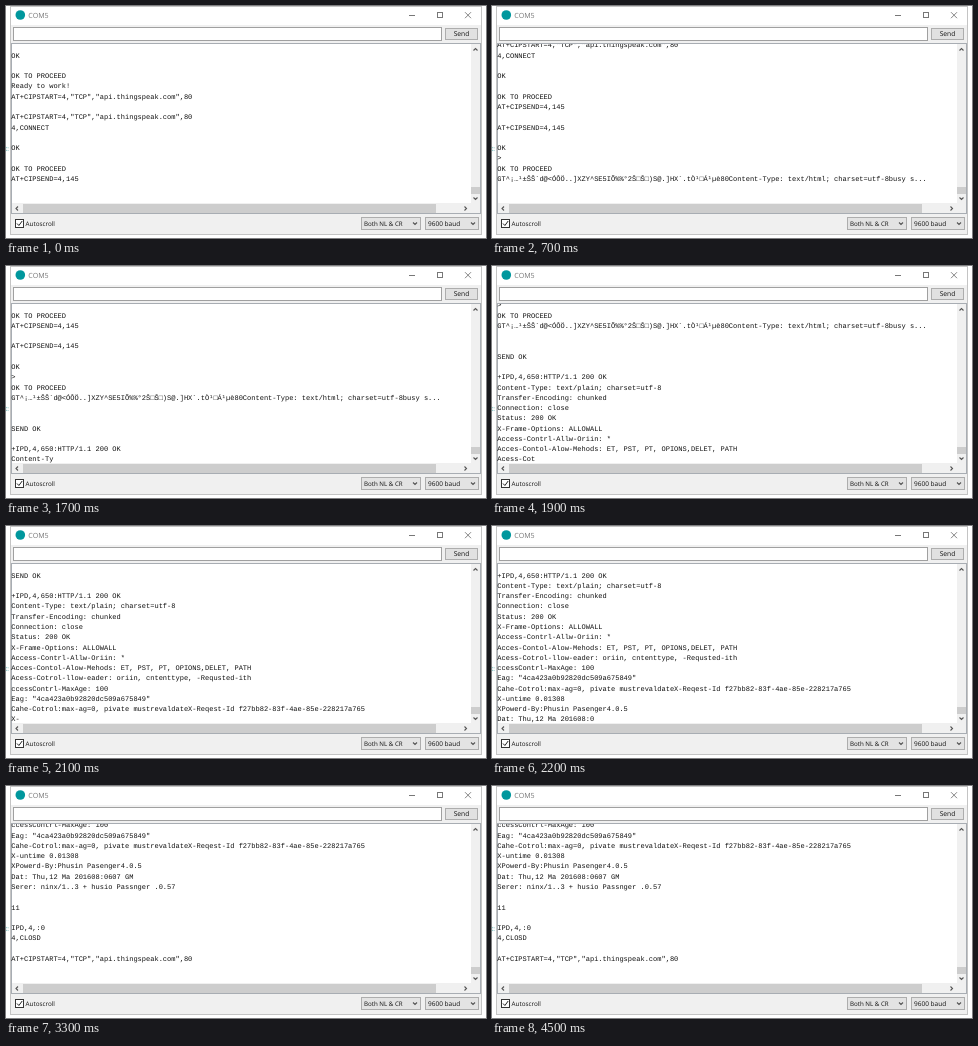
An HTML page with a canvas for the animation above (5100 ms loop, 480x232 px).

```html
<!DOCTYPE html>
<html lang="en">
<head>
<meta charset="utf-8">
<title>Serial monitor</title>
<style>
  html, body { margin: 0; width: 100%; height: 100%; overflow: hidden; background: #fff; }
  canvas { display: block; width: 480px; height: 232px; }
</style>
</head>
<body>
<canvas></canvas>
<script>
const LOOP = 5100, STEP = 100, ROW = 10.27, LAST_BASELINE = 195.4;
const MONO = '7.02px "Liberation Mono", monospace';
const UI = '"Open Sans", sans-serif';

const start = 'AT+CIPSTART=4,"TCP","api.thingspeak.com",80';
const send = 'AT+CIPSEND=4,145';
const lines = [
  'OK', '', 'OK TO PROCEED', 'Ready to work!', start, '',
  start, '4,CONNECT', '', 'OK', '', 'OK TO PROCEED', send, '',
  send, '', 'OK', '>', 'OK TO PROCEED',
  'GT^¡…¹±ŠŠ´d@<ÓÔÖ..]XZY^SE5IÕ%%°2Š□Š□)S@.]HX´.tÒ¹□Á¹µè80Content-Type: text/html; charset=utf-8busy s...',
  '', '', 'SEND OK', '',
  '+IPD,4,650:HTTP/1.1 200 OK',
  'Content-Type: text/plain; charset=utf-8',
  'Transfer-Encoding: chunked',
  'Connection: close',
  'Status: 200 OK',
  'X-Frame-Options: ALLOWALL',
  'Access-Contrl-Allw-Oriin: *',
  'Acces-Contol-Alow-Mehods: ET, PST, PT, OPIONS,DELET, PATH',
  'Acess-Cotrol-llow-eader: oriin, cntenttype, -Requsted-ith',
  'ccessContrl-MaxAge: 100',
  'Eag: "4ca423a0b92820dc509a675849"',
  'Cahe-Cotrol:max-ag=0, pivate mustrevaldateX-Reqest-Id f27bb82-83f-4ae-85e-228217a765',
  'X-untime 0.01308',
  'XPowerd-By:Phusin Pasenger4.0.5',
  'Dat: Thu,12 Ma 201608:0607 GM',
  'Serer: ninx/1..3 + husio Passnger .0.57',
  '', '11', '', 'IPD,4,:0', '4,CLOSD', '', start, '', ''
];
const log = lines.join('\n');
const at = (line, col = 0) => lines.slice(0, line).join('\n').length + 1 + col;

// Time in ms and how many characters have been received by then
const received = [
  [0, at(14)], [500, at(14)], [600, at(19)], [700, at(21)], [1600, at(21)],
  [1700, at(25, 10)], [1900, at(32, 9)], [2100, at(36, 2)], [2300, at(46)],
  [2900, at(46)], [3000, at(48)], [LOOP, at(48)]
];

function countAt(t) {
  const i = received.findIndex(([time]) => time > t);
  const [t0, n0] = received[i - 1], [t1, n1] = received[i];
  return Math.round(n0 + (n1 - n0) * (t - t0) / (t1 - t0));
}

const canvas = document.querySelector('canvas');
const ctx = canvas.getContext('2d');
const ratio = window.devicePixelRatio || 1;
canvas.width = 480 * ratio;
canvas.height = 232 * ratio;
ctx.scale(ratio, ratio);
ctx.textRendering = 'geometricPrecision';

function box(x, y, w, h, fill, stroke) {
  ctx.fillStyle = fill;
  ctx.fillRect(x, y, w, h);
  if (!stroke) return;
  ctx.strokeStyle = stroke;
  ctx.lineWidth = 1;
  ctx.strokeRect(x + .5, y + .5, w - 1, h - 1);
}

function path(color, width, ...points) {
  ctx.strokeStyle = color;
  ctx.lineWidth = width;
  ctx.beginPath();
  points.forEach(([x, y]) => ctx.lineTo(x, y));
  ctx.stroke();
}

function label(text, x, y, size, color = '#111') {
  ctx.font = `${size}px ${UI}`;
  ctx.fillStyle = color;
  ctx.fillText(text, x, y);
}

// Arrow head at (x, y) pointing along (dx, dy)
function chevron(x, y, dx, dy, color = '#555', r = 2) {
  const tail = s => [x - dx * r / 2 + s * dy * r, y - dy * r / 2 + s * dx * r];
  path(color, 1.1, tail(1), [x + dx * r / 2, y + dy * r / 2], tail(-1));
}

function combo(text, x, w, size) {
  box(x, 211, w, 13, '#e3e3e3', '#adadad');
  label(text, x + 3, 219.8, size);
  chevron(x + w - 6, 217.5, 0, 1);
}

function drawWindow() {
  box(0, 0, 480, 232, '#fff');
  label('t:', -1, 144.5, 6.5, '#3a9a9c');
  box(4, 0, 472, 229, '#f0f0f0', '#c4c4c4');
  box(5, 1, 470, 18, '#fff');

  ctx.fillStyle = '#00979d';
  ctx.beginPath();
  ctx.arc(14.3, 9, 4.8, 0, 7);
  ctx.fill();
  label('COM5', 22.3, 11.7, 7.1, '#777');
  path('#777', 1, [403, 9.5], [409, 9.5]);
  ctx.strokeStyle = '#777';
  ctx.strokeRect(431.5, 6.5, 5, 5);
  path('#777', .9, [459, 6.2], [465, 12.2]);
  path('#777', .9, [465, 6.2], [459, 12.2]);

  box(7, 21, 429, 14, '#fff', '#a0a0a0');
  box(439, 22, 33, 12, '#e1e1e1', '#adadad');
  label('Send', 447.7, 30.3, 6.7);

  box(5, 37, 470, 171, '#fff', '#a8adb3');
  box(465, 38, 9, 169, '#f0f0f0');
  box(6, 197, 468, 10, '#f0f0f0');
  box(465, 181, 9, 7, '#cdcdcd');
  box(17, 198, 413, 9, '#cdcdcd');
  chevron(469.5, 43.5, 0, -1);
  chevron(469.5, 192.5, 0, 1);
  chevron(11, 202.5, -1, 0);
  chevron(459.5, 202.5, 1, 0);

  box(9, 213, 9, 9, '#fff', '#333');
  path('#222', 1, [11, 217.5], [12.9, 219.5], [16.2, 215]);
  label('Autoscroll', 19.6, 219.8, 6.3);
  combo('Both NL & CR', 355, 60, 6.2);
  combo('9600 baud', 419, 54, 6.5);
}

function drawLog(t) {
  const rows = log.slice(0, countAt(t)).split('\n').slice(-16).reverse();
  ctx.save();
  ctx.beginPath();
  ctx.rect(5, 38, 460, 159);
  ctx.clip();
  ctx.font = MONO;
  ctx.fillStyle = '#111';
  rows.forEach((row, i) => ctx.fillText(row, 5.3, LAST_BASELINE - i * ROW));
  ctx.restore();
}

function frame(now) {
  const t = now % LOOP;
  drawWindow();
  drawLog(Math.floor(t / STEP) * STEP);
  requestAnimationFrame(frame);
}
frame(performance.now());
</script>
</body>
</html>
```
